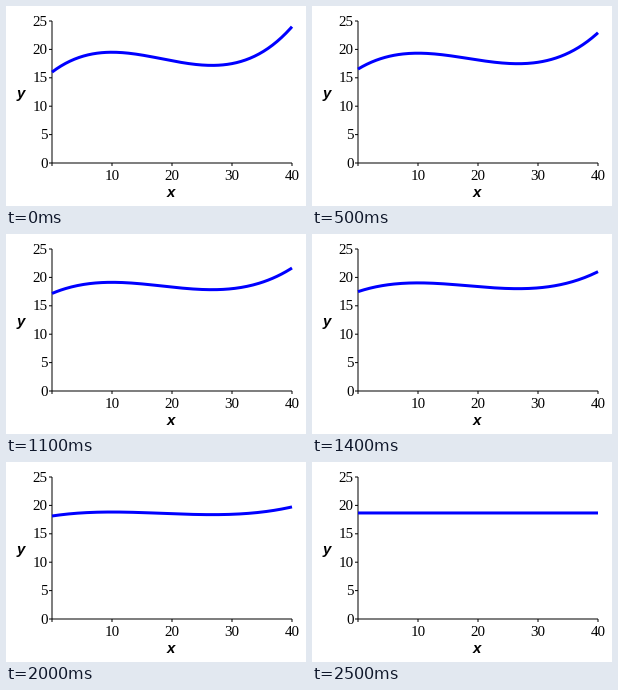
Recreate the animation shown at these times as a matplotlib script. Size 300 px wide and 200 px high, loop 3.7 s.

```python
import numpy as np
import matplotlib.pyplot as plt
from matplotlib.animation import FuncAnimation

W, H, DPI = 300, 200, 100
PT = 72 / DPI                 # points per pixel
FRAMES, FLAT_AT = 37, 25
LEFT, BASE = 46, 157
X_SCALE, Y_SCALE = 6, 5.68    # pixels per unit

fig = plt.figure(figsize=(W / DPI, H / DPI), dpi=DPI, facecolor="white")
ax = fig.add_axes([0, 0, 1, 1])
ax.set(xlim=(0, W), ylim=(H, 0))
ax.axis("off")


def px(x):
    return LEFT + X_SCALE * x


def py(y):
    return BASE - Y_SCALE * y


def rule(x0, y0, x1, y1):
    ax.plot([x0, x1], [y0, y1], color="black", lw=PT,
            solid_capstyle="butt", snap=False, zorder=3)


def label(x, y, text, ha, **font):
    ax.text(x, y, text, ha=ha, va="baseline", color="black", **font)


serif = dict(family="Liberation Serif", size=15 * PT)
title = dict(family="Liberation Sans", size=15 * PT,
             weight="bold", style="italic")

rule(LEFT, py(25), LEFT, BASE)
rule(LEFT, BASE, px(40), BASE)
for v in range(0, 26, 5):
    rule(LEFT - 3, py(v), LEFT, py(v))
    label(41.5, py(v) + 4.6, str(v), "right", **serif)
for v in range(0, 41, 10):
    rule(px(v), BASE, px(v), BASE + 3)
    if v:
        label(px(v), 174, str(v), "center", **serif)
label(165, 191, "x", "center", **title)
label(15, 92, "y", "center", **title)

xs = np.linspace(0, 40, 161)
cubic = 0.001 * xs**3 - 0.055 * xs**2 + 0.8 * xs + 16
MEAN = 56 / 3                 # average of the cubic over 0..40
curve, = ax.plot([], [], color="#0000ff", lw=3 * PT,
                 solid_capstyle="butt", snap=False, zorder=4)


def update(i):
    bend = max(0, 1 - i / FLAT_AT)
    curve.set_data(px(xs), py(MEAN + bend * (cubic - MEAN)))
    return curve,


anim = FuncAnimation(fig, update, frames=FRAMES, interval=100,
                     repeat=True, repeat_delay=0, blit=False)
plt.show()
```
